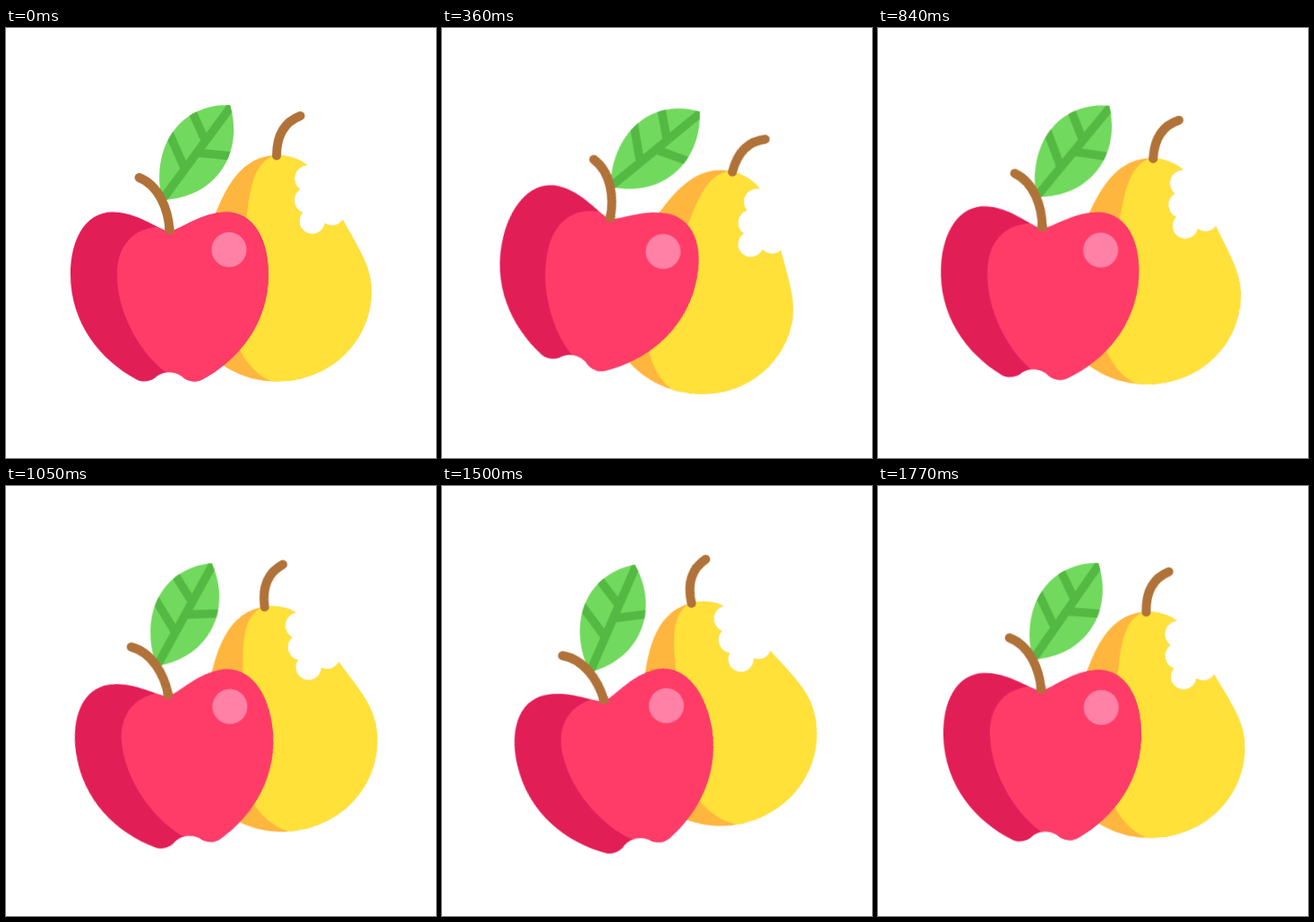
Animation, 480 px wide and 480 px high, one loop 1800 ms. Source, as an HTML page without scripts:

```html
<!DOCTYPE html>
<html lang="en">
<head>
<meta charset="utf-8">
<title>Apple and pear</title>
<style>
  html, body { margin: 0; width: 100%; height: 100%; overflow: hidden; background: #fff; }
  svg { display: block; width: 100%; height: 100%; }

  /* sine-like swing, starting upright and turning clockwise */
  .fruit {
    transform-origin: 240px 240px;
    animation: swing 900ms cubic-bezier(.3642, 0, .6358, 1) -450ms infinite alternate;
  }
  @keyframes swing {
    from { transform: rotate(-15deg); }
    to { transform: rotate(15deg); }
  }

  .stem { fill: none; stroke: #b07238; stroke-width: 10; stroke-linecap: round; }
  .veins { fill: none; stroke: #54b943; stroke-width: 9.5; }
</style>
</head>
<body>
<svg viewBox="0 0 480 480">
  <defs>
    <path id="pear" d="M303 142C316 142 327 146 336 153A15 15 0 0 0 328 180A15 15 0 0 0 331 206
      A14.4 14.4 0 1 0 356 218A14.4 14.4 0 0 0 376 214C391 242 408 265 408 293
      C408 351 361 394.500 302 394.500C243 394.500 196 347 196 289C196 258 219 240 231 214
      C241 192 256 142 303 142Z"/>
    <path id="apple" d="M182 228C168 223 145 205.500 119 205.500C88 205.500 72 237 72 275
      C72 330 106 371 145 392C152 396 160 395 166 391C175 382 190 382 199 391C205 395 212 396 220 392
      C259 371 293 330 293 275C293 237 277 205.500 246 205.500C220 205.500 197 223 182 228Z"/>
    <path id="leaf" d="M174 192C161 134 193 84 250 86C266 140 234 190 174 192Z"/>
    <clipPath id="inPear"><use href="#pear"/></clipPath>
    <clipPath id="inApple"><use href="#apple"/></clipPath>
    <clipPath id="inLeaf"><use href="#leaf"/></clipPath>
  </defs>

  <g class="fruit">
    <use href="#pear" fill="#ffb63e"/>
    <path clip-path="url(#inPear)" fill="#ffe139"
      d="M302 396C281 391 264 370 255 345C240 290 266 235 270 200C275 160 285 146 303 141H420V396Z"/>
    <path class="stem" d="M302 142.500C302 121 310 105 328.500 98"/>

    <use href="#leaf" fill="#71d95d"/>
    <g class="veins" clip-path="url(#inLeaf)">
      <path d="M172 195L253 85"/>
      <path d="M181 115L199 156M207 92L222 125M211 139L258 143.500"/>
    </g>

    <use href="#apple" fill="#e21e57"/>
    <path clip-path="url(#inApple)" fill="#ff3c68"
      d="M168 222C140 225 124 245 124 275C124 322 154 368 181 386L200 400H300V200H182Z"/>
    <path class="stem" stroke-linecap="butt" d="M182.500 225C181 203 171 176 148.500 167"/>
    <path fill="#b07238" d="M177 223L187.500 222V229.500H177.800Z"/>
    <circle cx="249" cy="247.500" r="19.500" fill="#ff82a6"/>
  </g>
</svg>
</body>
</html>
```
